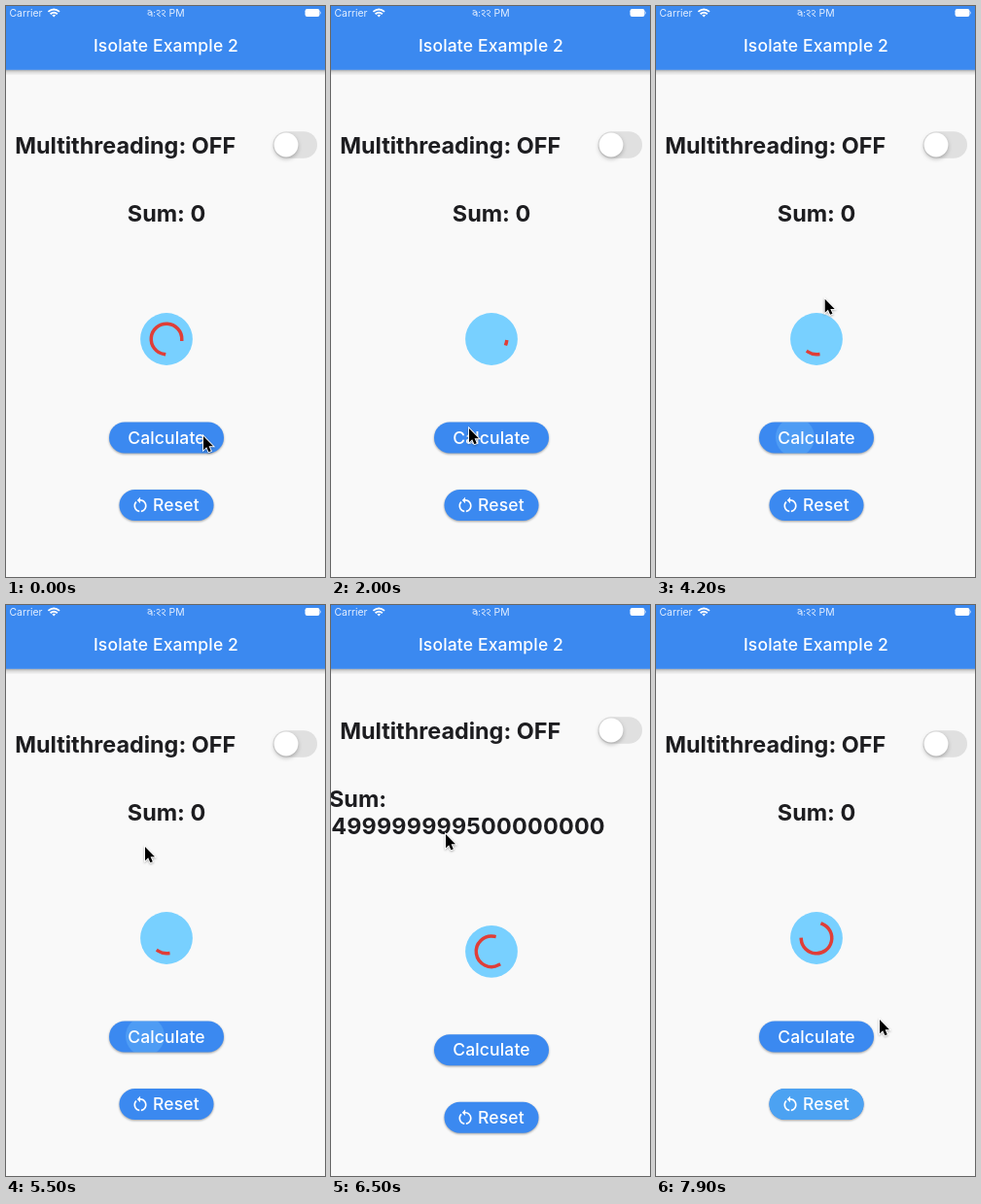
Recreate the animation shown at these times as an HTML page. Size 328 px wide and 588 px high, loop 8000 ms.

```html
<!DOCTYPE html>
<html lang="en">
<head>
<meta charset="utf-8">
<title>Isolate Example 2</title>
<style>
  html, body { margin: 0; width: 100%; height: 100%; overflow: hidden; background: #f9f9f9; }
  svg { display: block; width: 328px; height: 588px; }
  text { font-family: Inter, Roboto, sans-serif; }
  .status { font-size: 10.4px; fill: #e4efff; }
  .label { font-size: 17.5px; font-weight: 500; letter-spacing: .15px; fill: #fff; text-anchor: middle; }
  .head { font-size: 23.4px; font-weight: 700; fill: #1d1d20; text-anchor: middle; }
  .bar { fill: #3b89f0; }
  .raised { filter: drop-shadow(0 1.6px 1.3px rgba(0, 0, 0, .36)); }
</style>
</head>
<body>
<svg viewBox="0 0 328 588">
  <defs>
    <linearGradient id="shade" x2="0" y2="1">
      <stop offset="0" stop-opacity=".34"/>
      <stop offset=".4" stop-opacity=".13"/>
      <stop offset="1" stop-opacity="0"/>
    </linearGradient>
    <clipPath id="calcClip"><rect x="106" y="428.5" width="118" height="32" rx="16"/></clipPath>
    <clipPath id="resetClip"><rect x="116.5" y="498" width="97" height="32" rx="16"/></clipPath>
  </defs>
  <rect width="328" height="588" fill="#f9f9f9"/>

  <rect y="65.5" width="328" height="6" fill="url(#shade)"/>
  <rect class="bar" width="328" height="65.8"/>
  <text class="status" x="3.5" y="10.8">Carrier</text>
  <g fill="none" stroke="#fff" stroke-width="1.9">
    <path d="M43.4 5.9Q49.2 .9 55 5.9M45.6 8.3Q49.2 5.2 52.8 8.3"/>
    <path d="M47.4 9.6Q49.2 8.1 51 9.6L49.2 11.6Z" fill="#fff" stroke="none"/>
  </g>
  <g fill="none" stroke="#e4efff" stroke-linecap="round">
    <path d="M146 4.8c2-.8 4 .2 4 2.5v3.3M149.8 7.2c-1-1.4-3.7-1.1-3.8.7s2.5 1.8 3.6.5"/>
    <path d="M152.6 6.3v.1M152.6 10v.1" stroke-width="1.2"/>
    <path id="two" d="M154.9 5c2-1.3 3.7-.2 3.3 1.4-.4 1.4-2 1.8-3 1.8l3.3 2.5"/>
    <use href="#two" x="5.3"/>
  </g>
  <text class="status" x="167.6" y="10.8">PM</text>
  <rect x="307.5" y="3" width="15" height="8" rx="2.2" fill="#fff"/>
  <path d="M323.3 5.3q1.4 1.7 0 3.4z" fill="#fff"/>
  <text class="label" x="164.5" y="47">Isolate Example 2</text>

  <g id="upper">
    <text class="head" x="122.7" y="151.6">Multithreading: OFF</text>
    <rect x="274.5" y="129.3" width="45.5" height="27.4" rx="13.7" fill="#e0e0e0"/>
    <circle cx="288" cy="143" r="12.4" fill="#fff" style="filter: drop-shadow(0 2px 2px rgba(0,0,0,.26))"/>
  </g>
  <text class="head" id="zero" x="165" y="222.4">Sum: 0</text>
  <g id="result">
    <text class="head" style="text-anchor: start" x="-2" y="208.4">Sum:</text>
    <text class="head" x="141" y="236.2" letter-spacing=".2">499999999500000000</text>
  </g>

  <g id="lower">
    <circle cx="165" cy="343" r="26.9" fill="#78d0ff"/>
    <path id="arc" fill="none" stroke="#df3e38" stroke-width="3.5" stroke-linecap="square"/>
    <rect class="bar raised" x="106" y="428.5" width="118" height="32" rx="16"/>
    <g clip-path="url(#calcClip)"><circle id="calcInk" cx="143" cy="444" fill="#7cc6fa" fill-opacity=".3"/></g>
    <text class="label" x="165" y="450.7">Calculate</text>
    <rect class="bar raised" x="116.5" y="498" width="97" height="32" rx="16"/>
    <g clip-path="url(#resetClip)"><circle id="resetInk" cx="180" cy="513" fill="#4ca2f2"/></g>
    <path transform="translate(128.2 504) scale(.82)" fill="#fff" d="M12 5V2L8 6l4 4V7c3.31 0 6 2.69 6 6 0 2.97-2.17 5.43-5 5.91v2.02c3.95-.49 7-3.85 7-7.93 0-4.42-3.58-8-8-8zm-6 8c0-1.65.67-3.15 1.76-4.24L6.34 7.34C4.9 8.79 4 10.79 4 13c0 4.08 3.05 7.44 7 7.93v-2.02c-2.83-.48-5-2.94-5-5.91z"/>
    <text class="label" x="175" y="520">Reset</text>
  </g>

  <g id="cursor" style="filter: drop-shadow(0 1px 1px rgba(0,0,0,.3))">
    <path d="M0 0V14.2L3.2 11.2 5.4 16.2 7.8 15.2 5.6 10.3H10Z" stroke="#fff" stroke-width="1.8" paint-order="stroke"/>
  </g>
</svg>
<script>
const LOOP = 8000, STEP = 100;
const BLOCKED = 2285, DONE = 5900, RESET = 7600;
const $ = id => document.getElementById(id);
const clamp = x => Math.min(1, Math.max(0, x));
const frac = x => x - Math.floor(x);

// time, x, y of the pointer tip
const PATH = [
  [0, 203, 443], [300, 204, 436], [900, 207, 342], [1100, 207, 342],
  [1700, 142, 435], [2500, 142, 435], [3200, 164, 345], [3500, 167, 338],
  [4300, 174, 300], [4800, 174, 300], [5100, 168, 276], [5200, 168, 276],
  [5500, 143, 249], [5900, 130, 244], [6200, 70, 240], [6500, 118, 236],
  [6700, 150, 280], [7200, 181, 515], [7600, 181, 513], [7900, 230, 427]
];

// cubic-bezier(.4, 0, .2, 1)
function ease(x) {
  let lo = 0, hi = 1, s;
  for (let i = 0; i < 24; i++) {
    s = (lo + hi) / 2;
    const r = 1 - s;
    if (1.2 * r * r * s + .6 * r * s * s + s * s * s < x) lo = s; else hi = s;
  }
  return s * s * (3 - 2 * s);
}

function pointer(t) {
  const i = PATH.findIndex(p => p[0] > t);
  if (i < 0) return PATH[PATH.length - 1].slice(1);
  const [t0, x0, y0] = PATH[i - 1], [t1, x1, y1] = PATH[i];
  const k = (t - t0) / (t1 - t0), e = k * k * (3 - 2 * k);
  return [x0 + (x1 - x0) * e, y0 + (y1 - y0) * e];
}

function spinner(t) {
  const p = frac(.39 + t / 1333);
  const head = ease(clamp(p * 2)), tail = ease(clamp(p * 2 - 1));
  const start = -90 + 270 * tail + 90 * p + 154 + 360 * t / 2222;
  const sweep = Math.max(270 * (head - tail), .1);
  const at = deg => {
    const a = deg * Math.PI / 180;
    return `${165 + 15.75 * Math.cos(a)} ${343 + 15.75 * Math.sin(a)}`;
  };
  return `M${at(start)}A15.75 15.75 0 ${+(sweep > 180)} 1 ${at(start + sweep)}`;
}

function draw(t) {
  const blocked = t >= BLOCKED && t < DONE;
  const showSum = t >= DONE && t < RESET;
  $('arc').setAttribute('d', spinner(blocked ? BLOCKED : t));
  $('upper').setAttribute('transform', `translate(0 ${showSum ? -14 : 0})`);
  $('lower').setAttribute('transform', `translate(0 ${showSum ? 13.8 : 0})`);
  $('zero').style.display = showSum ? 'none' : '';
  $('result').style.display = showSum ? '' : 'none';
  $('calcInk').setAttribute('r', t < DONE ? 20 * clamp((t - 2100) / 180) : 0);
  $('resetInk').setAttribute('r', 75 * clamp((t - 7400) / 300));
  $('cursor').setAttribute('transform', `translate(${pointer(t).join(' ')})`);
}

const begin = performance.now();
function tick() {
  const t = (performance.now() - begin) % LOOP;
  draw(Math.floor(t / STEP) * STEP);
  requestAnimationFrame(tick);
}
tick();
</script>
</body>
</html>
```
